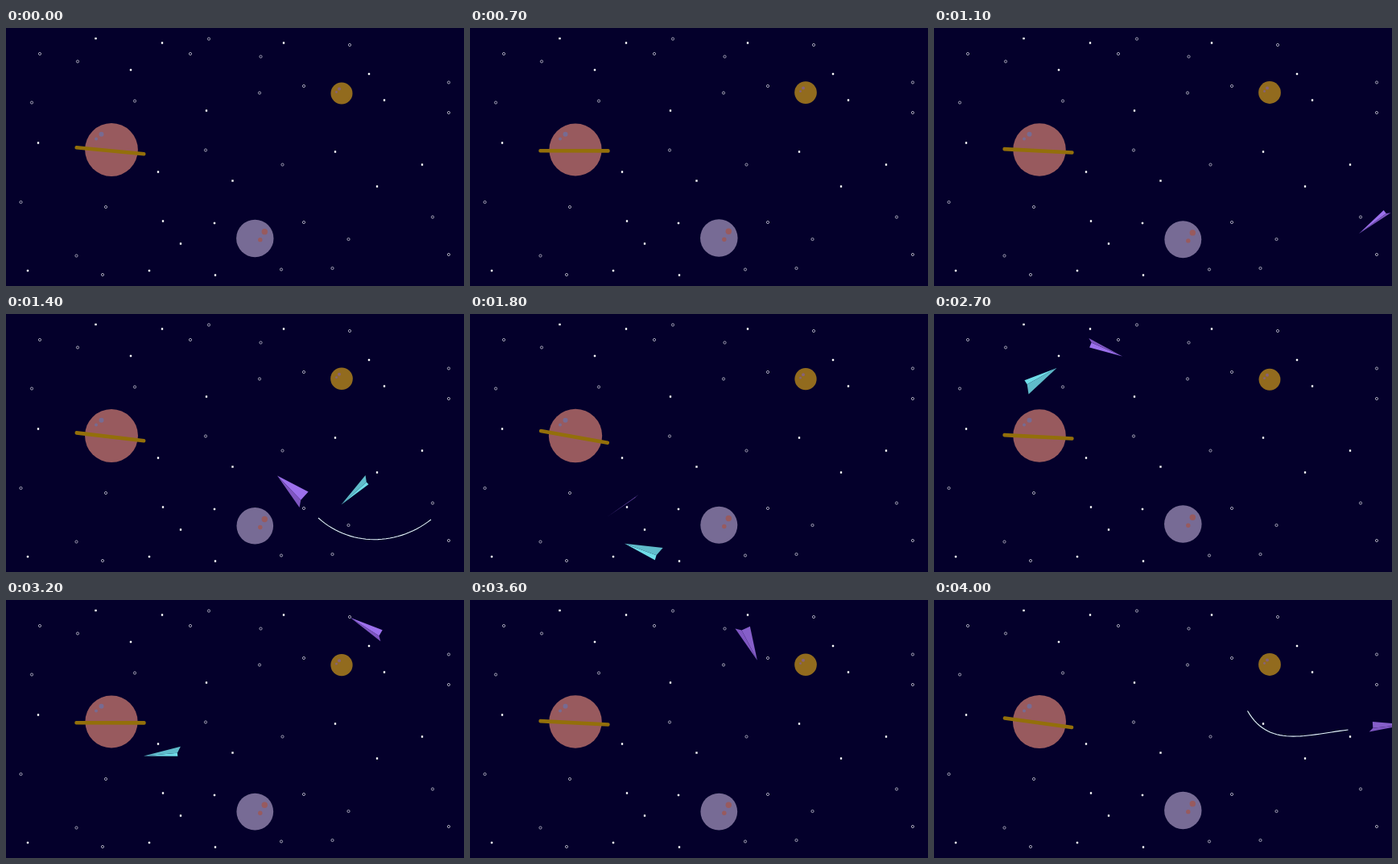
These frames come from a looping animation (569 by 320 pixels, 4100 ms). An HTML page with a canvas:

```html
<!DOCTYPE html>
<html lang="en">
<head>
<meta charset="utf-8">
<title>Paper planes in space</title>
<style>
  html, body { margin: 0; height: 100%; overflow: hidden; background: #04002b; }
  canvas { display: block; }
</style>
</head>
<body>
<canvas id="stage" width="569" height="320"></canvas>
<script>
const ctx = document.getElementById('stage').getContext('2d');
const LOOP = 4100, TAU = 2 * Math.PI, RAD = Math.PI / 180;
const SPEED = .8; // px per ms

const ringStars = [[42,32],[89,41.5],[252,13.5],[229,32],[316.5,35.5],[427,21],[32,92.5],[160,90.5],
  [315,80.5],[370,72],[550,67.5],[550,105],[248,151.5],[343.5,169.5],[18.5,216],[124,222],
  [87.5,282.5],[120,306],[370,241],[425.5,262],[342,299.5],[405.5,298],[530,234.5],[550,281]];
const crossStars = [[111.5,13],[194,18.5],[155,52],[345,18.5],[451,57],[470,89.5],[249,102.5],
  [40,142.5],[189,178.5],[281.5,189.5],[409,153.5],[517,169.5],[461,196.5],[195,239.5],
  [259,242],[217,267.5],[27,301],[178,301],[260,306.5]];

// route: time, nose x, nose y, heading in degrees; trail: times at which it starts and ends
const planes = [
  {
    top: '#9c70ec', under: '#865fc9', keel: '#7f57c2',
    span: t => 11 * Math.cos(TAU * (t - 1400) / 1570), fold: -.27,
    route: [[1000,600,210,142],[1100,528,255,142],[1300,388,253,222],[1400,337,200.5,222],
      [2000,73,242,218],[2200,35.5,126,286],[2700,234,52.5,22],[3200,428,22,210],
      [3700,389.5,137.5,60],[3900,514.5,161,-7],[4100,660,150,-4]],
    trails: [[1100,1300],[2000,2100],[3700,3900]]
  },
  {
    top: '#6fe3ec', under: '#6fdde8', keel: '#60bccb',
    span: t => 3.6 * Math.cos(TAU * (t - 1400) / 1700) - 9, fold: .3,
    route: [[1200,570,150,156],[1400,416.5,236.5,136],[1920,109.5,256,200],[2010,61,223,225],
      [2200,166,156,-39],[2500,60,60,160],[2700,152.5,67,-32.5],[3200,171,193.5,172.6],
      [3600,85,-60,-70]],
    trails: [[1920,2010]]
  }
];

const wave = (t, period, low) => (1 - Math.cos((t - low) / period * TAU)) / 2;

// Hermite curve that passes each key along its heading at cruising speed
function locate(route, t) {
  const next = Math.max(1, route.findIndex(key => key[0] >= t));
  const a = route[next - 1], b = route[next];
  const duration = b[0] - a[0], s = (t - a[0]) / duration;
  const axis = (k, trig) => {
    const m = SPEED * duration * trig(a[3] * RAD), n = SPEED * duration * trig(b[3] * RAD);
    const d = b[k] - a[k], c2 = 3 * d - 2 * m - n, c3 = m + n - 2 * d;
    return [a[k] + s * (m + s * (c2 + s * c3)), m + s * (2 * c2 + 3 * s * c3)];
  };
  const [x, dx] = axis(1, Math.cos), [y, dy] = axis(2, Math.sin);
  return { x, y, angle: Math.atan2(dy, dx) };
}

function circle(x, y, r) {
  ctx.beginPath();
  ctx.arc(x, y, r, 0, TAU);
}

function planet(x, y, r, color, spotColor, spots) {
  circle(x, y, r);
  ctx.fillStyle = color;
  ctx.fill();
  ctx.fillStyle = spotColor;
  for (const [dx, dy, size] of spots) {
    circle(x + dx, y + dy, size);
    ctx.fill();
  }
}

function line(points, color, width) {
  ctx.strokeStyle = color;
  ctx.lineWidth = width;
  ctx.beginPath();
  for (const [x, y] of points) ctx.lineTo(x, y);
  ctx.stroke();
}

function triangle(color, p, q) {
  ctx.fillStyle = color;
  ctx.beginPath();
  ctx.moveTo(0, 0);
  ctx.lineTo(...p);
  ctx.lineTo(...q);
  ctx.fill();
}

function drawStars() {
  ctx.strokeStyle = '#c6c5d2';
  ctx.lineWidth = .8;
  for (const [x, y] of ringStars) {
    circle(x, y, 1.6);
    ctx.stroke();
  }
  for (const [x, y] of crossStars) {
    line([[x - 1, y - 1], [x + 1, y + 1]], '#fff', 1.2);
    line([[x + 1, y - 1], [x - 1, y + 1]], '#fff', 1.2);
  }
}

function drawPlanets(t) {
  const tilt = wave(t, 2500, 650), sink = wave(t, 2000, 400), bob = wave(t, 3000, 1000);
  planet(131, 151, 32.6 + .6 * tilt, '#985a5e', '#776b92', [[-12.5, -19.3, 3], [-19, -13.5, 2]]);
  ctx.save();
  ctx.translate(129.5, 152.3);
  ctx.rotate(tilt * 10.2 * RAD);
  ctx.fillStyle = '#936f0a';
  ctx.beginPath();
  ctx.roundRect(-44.2, -2.3, 88.4, 4.6, 2);
  ctx.fill();
  ctx.restore();
  planet(309.3, 260 + 2.8 * sink, 23.4 - .6 * sink, '#776b95', '#985a5e',
    [[12, -8.3, 3.7], [6.5, 1.7, 2.7]]);
  planet(417, 80 + 1.3 * bob, 13.9 - .5 * bob, '#926b1e', '#876278',
    [[-3, -5.5, 2], [-6.5, -1.5, 1.4]]);
}

function drawTrail(route, start, end) {
  if (start >= end) return;
  const points = Array.from({ length: 31 }, (_, i) => {
    const { x, y } = locate(route, start + (end - start) * i / 30);
    return [x, y];
  });
  line(points, '#e4f6fa', 1.1);
}

function drawPlane({ top, under, keel, span, fold, route, trails }, t) {
  for (const [from, to] of trails) {
    drawTrail(route, Math.max(t - 300, from), Math.min(t - 100, to));
  }
  if (t < route[0][0] || t > route.at(-1)[0]) return;
  const { x, y, angle } = locate(route, t), width = span(t);
  const crease = [-42, width * fold];
  ctx.save();
  ctx.translate(x, y);
  ctx.rotate(angle);
  triangle(width > 0 ? top : under, [-42, width], crease);
  triangle(keel, crease, [-47, -width]);
  ctx.restore();
}

function draw(t) {
  ctx.fillStyle = '#04002b';
  ctx.fillRect(0, 0, 569, 320);
  drawStars();
  drawPlanets(t);
  for (const plane of planes) drawPlane(plane, t);
}

let begin;
function tick(now) {
  begin ??= now;
  draw((now - begin) % LOOP);
  requestAnimationFrame(tick);
}
requestAnimationFrame(tick);
</script>
</body>
</html>
```
